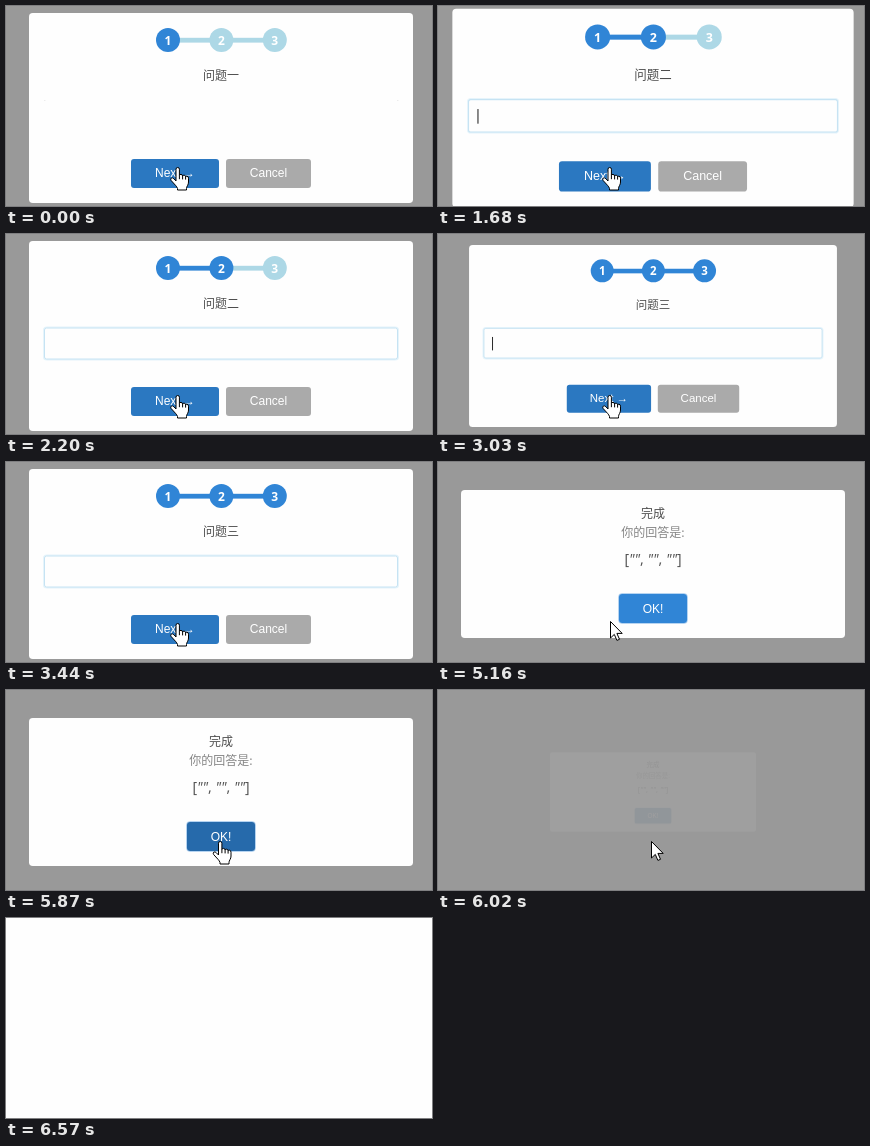
An HTML page that plays this animation: 426 by 200 pixels, repeating every 6870 ms.

```html
<!DOCTYPE html>
<html lang="zh">
<head>
<meta charset="utf-8">
<title>问题</title>
<style>
  html, body { margin: 0; width: 100%; height: 100%; overflow: hidden; background: #fefefe; }
  svg { display: block; width: 100vw; height: 100vh; }
  text { font: 12px "Liberation Sans", Arial, sans-serif; text-anchor: middle; fill: #fff; }
  .cjk { font-family: "Noto Sans CJK SC", "Noto Sans CJK", sans-serif; fill: #4d4d4d; }
  .digit { font: 700 12px "Open Sans", sans-serif; }
  .json { font: 14px "Noto Sans", sans-serif; fill: #545454; }
  .json tspan { font-style: italic; }
  .popup { fill: #fefefe; }
  .cursor { fill: #fff; stroke: #000; stroke-linejoin: round; }
  .ring { fill: none; stroke: #3085d6; stroke-opacity: .35; }
</style>
</head>
<body>
<svg viewBox="0 0 426 200">
  <rect id="backdrop" width="426" height="200" fill="#999"/>

  <g id="form">
    <rect class="popup" x="23" y="7" width="384" height="190" rx="3.75"/>
    <g id="steps"></g>
    <text id="question" class="cjk" x="215" y="74" font-weight="500"></text>
    <path id="corners" d="M38 94.5h1.5M391 94.5h1.5" stroke="#ececec"/>
    <g id="field">
      <rect x="38" y="93.5" width="354" height="32" rx="2.5" fill="none" stroke="#e6f4fb" stroke-width="2"/>
      <rect x="38.5" y="94" width="353" height="31" rx="2" fill="#fefefe" stroke="#c6e3f3"/>
      <rect id="caret" x="47" y="103" width="1" height="14" fill="#222"/>
    </g>
    <rect id="nextRing" class="ring" x="124.5" y="152.5" width="89" height="30" rx="3.5"/>
    <rect id="next" x="125" y="153" width="88" height="29" rx="3"/>
    <text x="169" y="171">Next →</text>
    <rect x="220" y="153" width="85" height="29" rx="3" fill="#aaa"/>
    <text x="262.5" y="171">Cancel</text>
  </g>

  <g id="result">
    <rect class="popup" x="23" y="28" width="384" height="148" rx="3.75"/>
    <text class="cjk" x="215" y="56" font-weight="700">完成</text>
    <text class="cjk" x="215" y="75" style="fill:#858585">你的回答是:</text>
    <text class="json" x="215" y="102">[<tspan>""</tspan>, <tspan>""</tspan>, <tspan>""</tspan>]</text>
    <rect class="ring" x="180.5" y="131.5" width="69" height="30" rx="3.5"/>
    <rect id="ok" x="181" y="132" width="68" height="29" rx="3"/>
    <text x="215" y="151">OK!</text>
  </g>

  <path id="arrow" class="cursor" d="M.5.5V17l3.8-3.6 2.6 6 2.6-1.1-2.6-5.9h5.3Z"/>
  <g id="hand" class="cursor">
    <path d="M-.5 2.2a1.7 1.7 0 0 1 3.4 0v6.4q.2-1.3 1.6-1.2 1.5.1 1.6 1.6.3-1 1.6-.8 1.4.2 1.4 1.6.3-.8 1.4-.6 1.5.3 1.5 2V15q0 2-1 3.6-1 1.6-1 3V23H1v-1.5q-.5-1.6-2-3.2l-4.3-4.7q-1.1-1.6.1-2.5 1.2-.8 2.6.7L-.5 14Z"/>
    <path d="M2.9 8.6v3.6M6.1 9v3.4M9.1 9.8v2.8" fill="none"/>
  </g>
</svg>
<script>
const LOOP = 6870;
const CENTER = [215, 102];
const BLUE = '#3085d6', PALE = '#add8e6';
const SHADES = { idle: BLUE, hover: '#2b78c1', pressed: '#266aab' };
const QUESTIONS = ['问题一', '问题二', '问题三'];
const $ = id => document.getElementById(id);

// Each cue changes part of the state and holds until the next one.
const cues = [
  [0, { view: 'form', step: 1, scale: 1, opacity: 1, caret: false, button: 'hover', cursor: 'hand', at: [170.5, 161] }],
  [1680, { step: 2, scale: 1.045, caret: true }],
  [1830, { scale: .97 }],
  [1950, { scale: 1 }],
  [2200, { caret: false }],
  [2760, { caret: true }],
  [2880, { step: 3, scale: 1.04 }],
  [3030, { scale: .958 }],
  [3160, { scale: 1 }],
  [3440, { caret: false }],
  [4000, { button: 'pressed' }],
  [4150, { view: 'result', scale: .922, button: 'idle', cursor: 'arrow', at: [170, 161] }],
  [4300, { scale: .964 }],
  [4420, { scale: 1 }],
  [5160, { at: [172, 159] }],
  [5310, { at: [192, 155], button: 'hover' }],
  [5440, { at: [213, 151] }],
  [5590, { cursor: 'hand' }],
  [5870, { button: 'pressed' }],
  [6020, { scale: .536, opacity: .06, cursor: 'arrow' }],
  [6140, { view: 'page', at: [234, 153] }],
  [6290, { at: [343, 176] }],
  [6420, { at: [380, 193] }],
  [6570, { cursor: 'none' }],
];

function show(id, visible) {
  $(id).style.display = visible ? '' : 'none';
}

function stepsMarkup(step) {
  const x = i => 162 + 53.4 * i;
  const color = on => on ? BLUE : PALE;
  const lines = [0, 1].map(i =>
    `<rect x="${x(i)}" y="31.8" width="53.4" height="4.8" fill="${color(i + 1 < step)}"/>`);
  const dots = [0, 1, 2].map(i =>
    `<circle cx="${x(i)}" cy="34" r="12" fill="${color(i < step)}"/>` +
    `<text class="digit" x="${x(i)}" y="38.5">${i + 1}</text>`);
  return lines.concat(dots).join('');
}

function render(s) {
  const [cx, cy] = CENTER;
  show('backdrop', s.view !== 'page');
  for (const id of ['form', 'result']) {
    show(id, s.view === id);
    $(id).setAttribute('transform', `translate(${cx} ${cy}) scale(${s.scale}) translate(${-cx} ${-cy})`);
    $(id).setAttribute('opacity', s.opacity);
  }
  $('steps').innerHTML = stepsMarkup(s.step);
  $('question').textContent = QUESTIONS[s.step - 1];
  show('corners', s.step === 1);
  show('field', s.step > 1);
  show('caret', s.caret);
  show('nextRing', s.button === 'pressed');
  $('next').setAttribute('fill', SHADES[s.button]);
  $('ok').setAttribute('fill', SHADES[s.button]);
  for (const id of ['arrow', 'hand']) {
    show(id, s.cursor === id);
    $(id).setAttribute('transform', `translate(${s.at})`);
  }
}

const start = performance.now();
let current = -1;
function tick() {
  const t = (performance.now() - start) % LOOP;
  const index = cues.findLastIndex(([time]) => time <= t);
  if (index !== current) {
    current = index;
    render(Object.assign({}, ...cues.slice(0, index + 1).map(([, change]) => change)));
  }
  requestAnimationFrame(tick);
}
tick();
</script>
</body>
</html>
```
